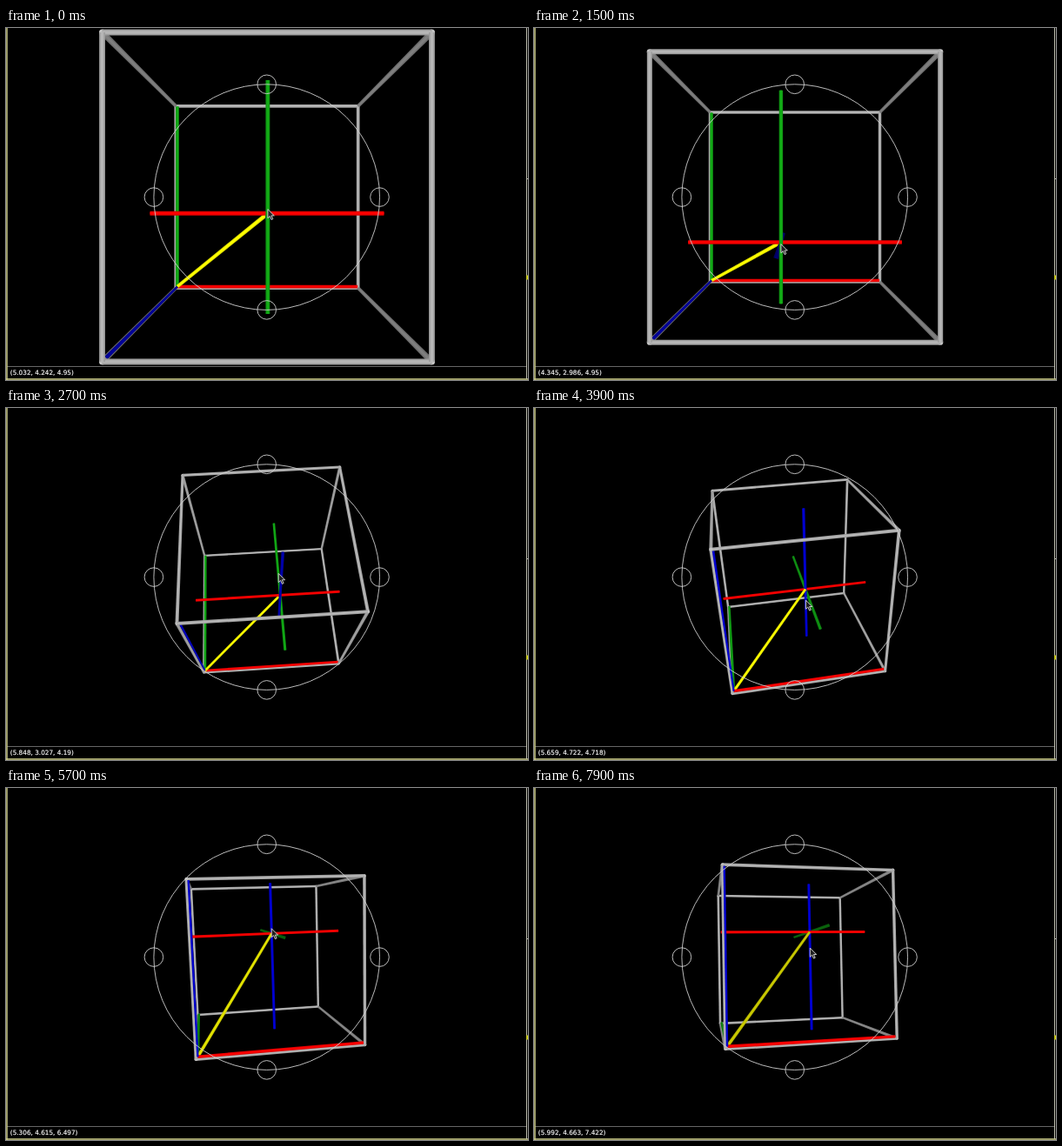
Animation of 600 by 405 pixels, one loop 8 s. Source, as an HTML page:

```html
<!DOCTYPE html>
<html lang="en">
<head>
<meta charset="utf-8">
<title>3D cursor in a box</title>
<style>
  html, body { margin: 0; width: 100%; height: 100%; overflow: hidden; background: #000; }
  svg { display: block; width: 600px; height: 405px; }
  text { font: 7.3px "DejaVu Sans", sans-serif; fill: #fff; stroke: #fff; stroke-width: .15; }
</style>
</head>
<body>
<svg viewBox="0 0 600 405">
  <rect width="600" height="405"/>
  <g id="scene"></g>
  <g id="ball" fill="none" stroke="#d0d0d0" stroke-width=".9"></g>
  <path id="mouse" d="M0 0V10.2L2.4 8 4.2 12 5.9 11.2 4.2 7.4H7.4Z" fill="#222" stroke="#ddd" stroke-width=".9"/>
  <path d="M1 389.5H598" stroke="#666"/>
  <path d="M1 0V405M0 404H600" stroke="#cfcf8c" stroke-width="1.5"/>
  <path d="M598.5 0V404M598 173.5H600" stroke="#c4c4b4"/>
  <path d="M598 287H600" stroke="#cccc20" stroke-width="5"/>
  <text id="label" x="4.8" y="399"></text>
</svg>
<script>
const LOOP = 8000, STEP = 200;
const FOCAL = 468, CX = 300, CY = 194.5, TUBE = 0.18;
const GREY = [182, 182, 182], YELLOW = [255, 255, 0];
const AXES = [[255, 0, 0], [18, 172, 22], [0, 0, 215]];
const $ = id => document.getElementById(id);

// time, pitch, yaw, roll in degrees
const turns = [
  [1500, 0, 0, 0],
  [2700, 27.5, 3.5, .3],
  [3900, 60.6, 8.6, 2.2],
  [4900, 75.5, 5.7, 2.5],
  [6500, 91.1, 12, 1.1]
];

// time, reported x y z, how far the drag runs ahead of the report
const spots = [
  [0, 5.032, 4.242, 4.95, .06],
  [1500, 4.345, 2.986, 4.95, -.1],
  [2700, 5.848, 3.027, 4.19, .92],
  [3900, 5.659, 4.722, 4.718, -.62],
  [4900, 4.692, 4.595, 3.606, .26],
  [6500, 5.921, 4.636, 9.388, 0],
  [7900, 5.992, 4.663, 7.422, -.72]
];

const ramp = (t, from, to) => Math.max(0, Math.min(1, (t - from) / (to - from)));

function sample(rows, t) {
  let i = 0;
  while (i < rows.length - 2 && t >= rows[i + 1][0]) i++;
  const a = rows[i], b = rows[i + 1], u = ramp(t, a[0], b[0]);
  return a.slice(1).map((v, n) => v + (b[n + 1] - v) * u);
}

function circle(x, y, r, fill = 'none') {
  return `<circle cx="${x.toFixed(2)}" cy="${y.toFixed(2)}" r="${r.toFixed(2)}" fill="${fill}"/>`;
}

function trackball(x, y, r) {
  const knobs = [0, 1, 2, 3].map(k => k * Math.PI / 2)
    .map(a => circle(x + r * Math.cos(a), y + r * Math.sin(a), 10.8));
  return circle(x, y, r) + knobs.join('');
}

function camera(t) {
  const [p, a, r] = sample(turns, t).map(d => d * Math.PI / 180);
  const dist = 17.35 + 1.65 * ramp(t, 0, 1500) + 9 * ramp(t, 2100, 2700);
  const turn = (x, y, q) => [x * Math.cos(q) - y * Math.sin(q), x * Math.sin(q) + y * Math.cos(q)];
  return point => {
    let [x, y, z] = point.map(v => v - 5);
    [x, y] = turn(x, y, a);
    [y, z] = turn(y, z, -p);
    [x, y] = turn(x, y, r);
    const s = FOCAL / (dist - z);
    return { x: CX + x * s, y: CY - y * s, z, w: TUBE * s };
  };
}

const rgb = (c, m) => `rgb(${c.map(v => Math.min(255, Math.round(v * m)))})`;

function strip(a, b, scale, fill) {
  const dx = b.x - a.x, dy = b.y - a.y, len = Math.hypot(dx, dy) || 1;
  const nx = -dy / len * scale / 2, ny = dx / len * scale / 2;
  const at = (p, s) => `${(p.x + nx * p.w * s).toFixed(2)},${(p.y + ny * p.w * s).toFixed(2)}`;
  return `<polygon points="${at(a, 1)} ${at(b, 1)} ${at(b, -1)} ${at(a, -1)}" fill="${fill}"/>`;
}

function draw(t) {
  const view = camera(t), items = [];
  const [x, y, z, lead] = sample(spots, t);
  // the drag moves along y first, then along z
  const ahead = d => t < 3400 ? [x, y + d, z] : [x, y, z + d];
  const point = ahead(lead);

  // tubes darken as they turn end-on to the viewer
  function tube(from, to, color, dim = 0, bias = 0, width = 1) {
    const a = view(from), b = view(to);
    const m = 1 - dim * Math.abs((b.z - a.z) / 10) ** 8;
    const svg = strip(a, b, width, rgb(color, m * .87)) + strip(a, b, width / 2, rgb(color, m));
    items.push({ z: (a.z + b.z) / 2 + bias, svg });
  }

  AXES.forEach((color, k) => {
    const line = (base, lo, hi) => [lo, hi].map(v => base.map((c, i) => i === k ? v : c));
    for (const u of [0, 10]) for (const v of [0, 10]) {
      const base = [0, 0, 0];
      base[(k + 1) % 3] = u;
      base[(k + 2) % 3] = v;
      tube(...line(base, 0, 10), GREY, .3);
    }
    tube(...line([.1, .1, .1], .1, 9.95), color, .3, .3, k === 2 ? .65 : 1);
    tube(...line(point, 0, 10), color, .5, k === 2 ? -.1 : 0);
  });
  const glow = 1 - .2 * ramp(t, 4900, 6500);
  tube([.1, .1, .1], point, YELLOW.map(v => v * glow), 0, .3);

  for (let n = 0; n < 8; n++) {
    const c = view([n & 1, n >> 1 & 1, n >> 2].map(v => v * 10));
    items.push({ z: c.z - .5, svg: circle(c.x, c.y, c.w * .52, '#c4c4c4') });
  }

  items.sort((a, b) => a.z - b.z);
  $('scene').innerHTML = items.map(i => i.svg).join('');
  const tip = view(ahead(lead * 2.7));
  $('mouse').setAttribute('transform', `translate(${tip.x.toFixed(1)} ${(tip.y - 2).toFixed(1)})`);
  $('label').textContent = `(${[x, y, z].map(v => +v.toFixed(3)).join(', ')})`;
}

$('ball').innerHTML = trackball(299.7, 194.6, 129.8);
const start = performance.now();
let shown = -1;
function tick() {
  const t = (performance.now() - start) % LOOP;
  const step = t < 100 ? 0 : Math.floor((t - 100) / STEP) * STEP + 100;
  if (step !== shown) draw(shown = step);
  requestAnimationFrame(tick);
}
tick();
</script>
</body>
</html>
```
